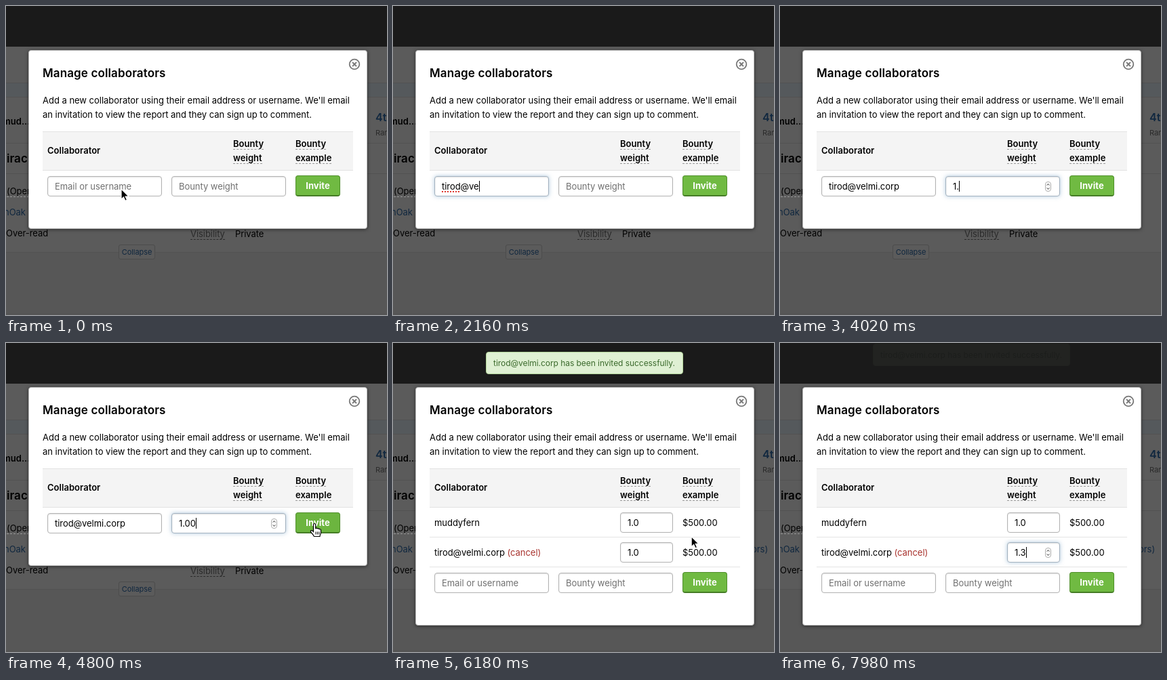
Write an HTML page that moves like this. It is 562 px wide and 456 px high and loops after 8 s.

```html
<!DOCTYPE html>
<html lang="en">
<head>
<meta charset="utf-8">
<title>Manage collaborators</title>
<style>
html, body { margin: 0; width: 100%; height: 100%; overflow: hidden; }
body { font: 13px/20px Inter, "Noto Sans", sans-serif; letter-spacing: -.05px; color: #000; }
#stage { position: relative; width: 562px; height: 456px; overflow: hidden; background: #5b5b5b; }
#stage div, #stage svg { position: absolute; box-sizing: border-box; white-space: pre; }
.b { font-weight: 600; letter-spacing: .04px; }
.link { color: #10273f; }
.dash { line-height: 16px; margin-top: 2px; border-bottom: 1px dashed #999; }
.line { left: 0; width: 562px; height: 1px; background: #525252; }
#dialog { left: 33px; top: 65px; width: 500px; background: #fff; border: 1px solid #b4b4b4;
  border-radius: 4px; box-shadow: 0 1px 5px rgba(0,0,0,.5); }
.rule { left: 54px; width: 458px; height: 1px; background: #e4e4e4; }
.field { height: 30px; line-height: 28px; padding-left: 10px; background: #fff; border: 1px solid #b2b2b2;
  border-radius: 4px; box-shadow: inset 0 1px 2px rgba(0,0,0,.12); }
.field.on { border-color: #a3b2c0; box-shadow: inset 0 1px 2px rgba(0,0,0,.12), 0 0 6px rgba(100,150,190,.5); }
.field .hint { color: #707070; }
.field i { display: inline-block; width: 1px; height: 16px; margin: 0 -1px 0 0; background: #000; vertical-align: -3px; }
.bad { text-decoration: underline dotted #e0382e 2px; text-underline-offset: 2px; }
.spin { right: 12px; top: 7px; visibility: hidden; }
.on .spin { visibility: visible; }
.layer { left: 0; top: 0; width: 562px; height: 0; }
#invite { left: 427px; top: 250px; width: 66px; height: 31px; line-height: 28px; text-align: center;
  font-weight: 700; color: #fff; border: 1px solid #4f8f2b; border-bottom: 2px solid #457c26; border-radius: 4px; }
#toast { left: 137px; top: 0; width: 291px; height: 33px; line-height: 31px; padding-left: 10px; font-size: 12px;
  color: #3b6a2c; background: #dff0d3; border: 1px solid #b5d79c; border-radius: 4px; }
#cursor { left: 0; top: 0; overflow: visible; }
</style>
</head>
<body>
<div id="stage"></div>
<script>
const LOOP = 8000;
const MAIL = 'tirod@velmi.corp', USER = 'muddyfern';
const MAIL_KEYS = [1080, 1200, 1320, 1380, 1500, 1800, 1980, 2160, 2280, 2400, 2460, 2580, 2640, 2820, 2940, 3060];
const WEIGHT_KEYS = [3840, 4020, 4080, 4200];
// time, x, y of the pointer tip
const PATH = [
  [0, 170, 270], [180, 170, 270], [600, 216, 270], [4380, 222, 270], [4800, 455, 267],
  [5040, 455, 267], [5580, 453, 267], [5760, 453, 267], [6540, 430, 300], [6720, 430, 300],
  [7080, 362, 314], [LOOP, 362, 314]
];
const stage = document.getElementById('stage');

function box(parent, cls, css, html = '') {
  const el = document.createElement('div');
  el.className = cls;
  el.style.cssText = css;
  el.innerHTML = html;
  parent.append(el);
  return el;
}
// text placed by its left edge and the middle of its capitals
const label = (parent, text, x, cy, cls = '', css = '') =>
  box(parent, cls, `left:${x}px;top:${cy - 10}px;${css}`, text);

const SPIN = `<svg class="spin" width="9" height="15" viewBox="0 0 9 15" fill="none">
  <rect x=".5" y=".5" width="8" height="14" rx="3.5" fill="#fafafa" stroke="#b0b0b0"/>
  <path d="M2.7 5.6l1.8-2 1.8 2M2.7 9.4l1.8 2 1.8-2" stroke="#333"/></svg>`;

function field(parent, x, y, w, hint, spin) {
  const el = box(parent, 'field', `left:${x}px;top:${y}px;width:${w}px`, '<span></span>' + (spin ? SPIN : ''));
  const span = el.firstChild;
  let last;
  return (html, focused, caret = focused) => {
    const mark = caret ? '<i></i>' : '';
    const next = html ? html + mark : `${mark}<span class="hint">${hint}</span>`;
    if (next !== last) span.innerHTML = last = next;
    el.classList.toggle('on', focused);
  };
}

// page behind the dialog
box(stage, '', 'left:0;top:0;width:562px;height:60px;background:#1a1a1a');
box(stage, '', 'left:0;top:113px;width:562px;height:21px;background:#55595c');
box(stage, '', 'left:0;top:363px;width:562px;height:93px;background:#575757');
for (const y of [113, 134, 202, 247, 363, 454]) box(stage, 'line', `top:${y}px`);
label(stage, 'mud...', -5, 170, 'b');
label(stage, 'irac', 1, 225, 'b', 'font-size:17px');
label(stage, '(Open', 1, 273, 'dash');
label(stage, 'nOak', -3, 304, 'link');
label(stage, 'Over-read', 0, 335);
label(stage, '4th', 545, 164, 'b link', 'font-size:16px');
label(stage, 'Rank', 545, 187, '', 'font-size:11px;color:#2a2a2a');
label(stage, 'Visibility', 272, 336, 'dash', 'color:#2b2b2b;border-color:#2b2b2b');
label(stage, 'Private', 338, 336);
const manage = label(stage, 'ors)', 529, 304, 'link');
box(stage, 'link', `left:166px;top:352px;width:54px;height:22px;line-height:20px;text-align:center;
  font-size:11px;background:#5b5b5b;border:1px solid #4c4c4c;border-radius:3px`, 'Collapse');

const toast = box(stage, '', '', `${MAIL} has been invited successfully.`);
toast.id = 'toast';

// dialog
const dialog = box(stage, '', '');
dialog.id = 'dialog';
const body = box(stage, 'layer', '');
label(body, 'Manage collaborators', 54, 99, 'b', 'font-size:17px;letter-spacing:.12px');
const prose = 'letter-spacing:-.02px';
label(body, "Add a new collaborator using their email address or username. We'll email", 54, 139, '', prose);
label(body, 'an invitation to view the report and they can sign up to comment.', 54, 160, '', prose);
box(body, '', `left:505px;top:77px`, `<svg width="18" height="18" fill="none" stroke="#787878" stroke-width="1.8">
  <circle cx="9" cy="9" r="7.3"/><path d="M6 6l6 6M12 6l-6 6"/></svg>`);
box(body, '', 'left:54px;top:185px;width:458px;height:58px;background:#f4f4f4;border:solid #e2e2e2;border-width:1px 0');
label(body, 'Collaborator', 61, 213, 'b');
label(body, 'Bounty', 335, 203, 'b dash');
label(body, 'weight', 335, 224, 'b dash');
label(body, 'Bounty', 427, 203, 'b dash');
label(body, 'example', 427, 224, 'b dash');

function row(name) {
  const el = box(body, 'layer', '');
  label(el, name, 61, 265);
  box(el, 'rule', 'top:286px');
  return { el, weight: field(el, 335, 250, 78, '', true), price: label(el, '', 427, 265) };
}
const owner = row(USER);
const guest = row(`${MAIL} <span style="color:#a8322d">(cancel)</span>`);

const form = box(body, 'layer', '');
const mail = field(form, 61, 251, 169, 'Email or username');
const weight = field(form, 244, 251, 169, 'Bounty weight', true);
const invite = box(form, 'b', '', 'Invite');
invite.id = 'invite';

// pointers, drawn from the tip
const SHAPES = {
  arrow: '<path d="M0 0V15.2L3.5 12 5.9 17.4 8.5 16.3 6.1 11H11Z" fill="#000" stroke="#fff" stroke-width="1.2"/>',
  beam: `<path d="M-3.5-8Q0-8 0-5.5Q0-8 3.5-8M0-6V6M-3.5 8Q0 8 0 5.5Q0 8 3.5 8M-2 3H2"
    fill="none" stroke="#111" stroke-width="1.3"/>`,
  hand: `<path d="M-1.5 1.5Q-1.5-.5 0-.5Q1.7-.5 1.7 1.5V6.5Q3 5.5 4.3 6.8Q5.8 6 7 7.6Q9.5 7.2 9.5 9.5V12.5
    Q9.5 14.5 8 17.5V18.5H-.5Q-2 15.5-5 12.5Q-6.5 10.3-4.8 9.6Q-3.3 9.2-1.5 11.5Z" fill="#fff" stroke="#000" stroke-width="1.2"/>
    <path d="M2 11.5v4M4.4 11.5v4M6.8 11.5v4" stroke="#000"/>`
};
stage.insertAdjacentHTML('beforeend', '<svg id="cursor" width="1" height="1"></svg>');
const cursor = document.getElementById('cursor');
let shown;

const typed = (text, keys, t) => text.slice(0, keys.filter(k => k <= t).length);
const show = (el, on) => { el.style.visibility = on ? 'visible' : 'hidden'; };
const shift = (el, y) => { el.style.transform = `translateY(${y}px)`; };

function pointAt(t) {
  const i = PATH.findIndex(p => p[0] > t);
  const [t0, x0, y0] = PATH[i - 1], [t1, x1, y1] = PATH[i];
  const u = (t - t0) / (t1 - t0), e = u * u * (3 - 2 * u);
  return [x0 + (x1 - x0) * e, y0 + (y1 - y0) * e];
}

function kindAt(t, x) {
  if (t < 180) return 'arrow';
  if (t >= 5580) return x < 413 ? 'beam' : 'arrow';
  if (x >= 427) return 'hand';
  return x < 230 || (x > 244 && x < 413) ? 'beam' : 'arrow';
}

// spelling marks under finished words
function spelled(text, t) {
  const mark = w => `<span class="bad">${w}</span>`;
  if (t >= 3360 || t < 1860) return text;
  const [name, host] = text.split('@');
  const [word, ...end] = host.split('.');
  return `${mark(name)}@` + (end.length && t >= 2640 ? `${mark(word)}.${end}` : host);
}

function render(t) {
  const rows = t < 5580 ? 0 : t < 5940 ? 1 : 2;
  dialog.style.height = 264 + 44 * rows + 'px';
  shift(form, 44 * rows);
  shift(guest.el, 44 * Math.max(0, rows - 1));
  guest.el.style.display = rows > 0 ? '' : 'none';
  owner.el.style.display = rows > 1 ? '' : 'none';
  show(manage, rows > 1);

  const mailOn = t >= 300 && t < 3360, weightOn = t >= 3360 && t < 4980;
  mail(rows ? '' : spelled(typed(MAIL, MAIL_KEYS, t), t), mailOn, mailOn && !(t >= 780 && t < 1080));
  weight(rows ? '' : typed('1.00', WEIGHT_KEYS, t), weightOn);

  owner.weight('1.0', false);
  guest.weight(t < 7560 ? '1.0' : t < 7740 ? '1.' : '1.3', t >= 7140);
  owner.price.textContent = '$500.00';
  guest.price.textContent = rows > 1 ? '$500.00' : '$1000.00';

  const [x, y] = pointAt(t);
  const kind = kindAt(t, x);
  const pressed = t >= 4980 && t < 5040;
  invite.style.background = pressed ? '#579a33' : kind === 'hand' && t >= 4380 ? '#6cb53f' : '#70ba42';
  invite.style.boxShadow = t >= 4980 && t < 5940 ? '0 0 5px rgba(70,130,120,.5)' : 'none';

  const fade = Math.min(1, Math.max(0, (t - 7500) / 480));
  show(toast, t >= 5580);
  toast.style.opacity = 1 - .96 * fade;
  shift(toast, 13 - 12 * fade);

  show(cursor, t < 1080 || (t >= 4380 && t < 7560));
  if (kind !== shown) cursor.innerHTML = SHAPES[shown = kind];
  cursor.style.transform = `translate(${x}px,${y}px)`;
}

const start = performance.now();
function frame() {
  render((performance.now() - start) % LOOP);
  requestAnimationFrame(frame);
}
frame();
</script>
</body>
</html>
```
